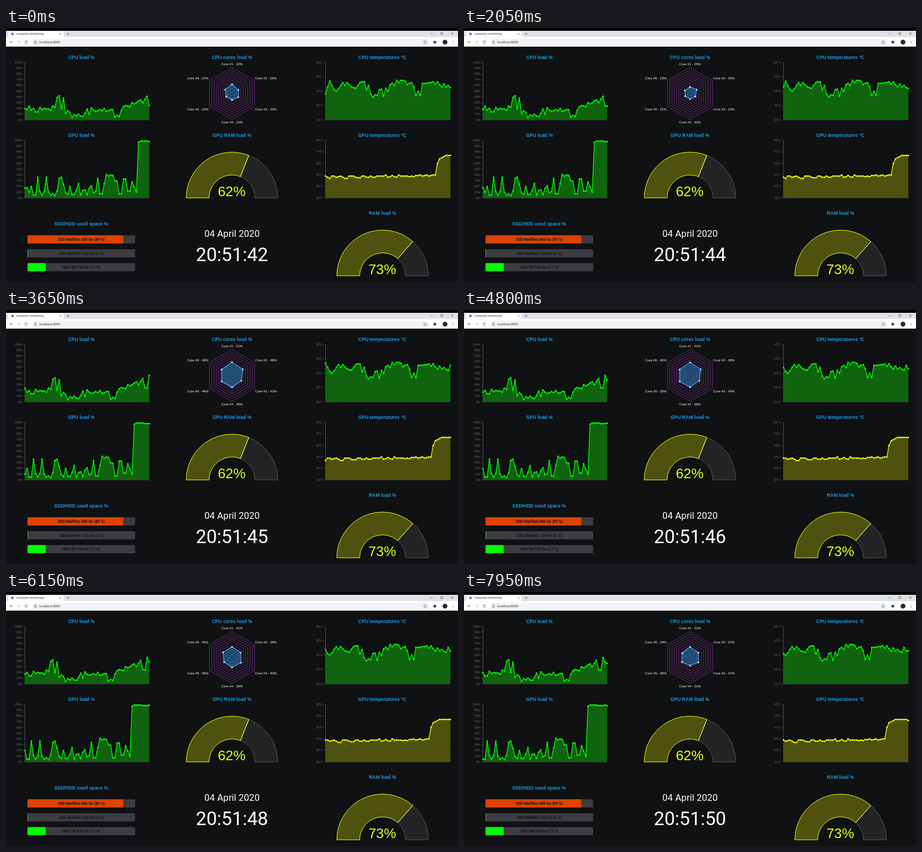
An HTML page for the animation above (8 s loop, 800x450 px).

```html
<!DOCTYPE html>
<html lang="en">
<head>
<meta charset="utf-8">
<title>computer-monitoring</title>
<style>
html, body { margin: 0; width: 100%; height: 100%; overflow: hidden; background: #0f1112; }
svg { display: block; width: 800px; height: 450px; }
text { font-family: "Liberation Sans", Arial, sans-serif; }
.title { font-size: 8.4px; font-weight: bold; fill: #2196dc; text-anchor: middle; }
.tick { font-size: 4.9px; fill: #6b6b6b; text-anchor: end; }
.core { font-size: 5.9px; fill: #fff; }
.roboto { font-family: Roboto, sans-serif; }
.middle { text-anchor: middle; }
</style>
</head>
<body>
<svg id="stage" viewBox="0 0 800 450"></svg>
<script>
const LOOP = 8000;
const POINTS = 59;
const STARTS = [-100, 1390, 2940, 4790, 6490];
const TWEEN = 1000;
const GREEN = '#00ff00', YELLOW = '#eeff10';

const charts = [
  { id: 'cpu', title: 'CPU load %', x: 33.5, y: 61, w: 220, min: 0, max: 100, step: 10, unit: '%', color: GREEN, fill: '#10640f',
    data: [20,18,24,17,20,14,14,22,18,20,19,19,17,24,22,39,42,20,38,11,16,13,4,9,7,10,7,6,11,19,10,21,17,15,16,18,
      16,20,15,16,18,18,5,8,6,17,23,25,24,23,30,28,30,33,35,30,36,41,25,24,46,38,36] },
  { id: 'temp', title: 'CPU temperatures °C', x: 565.5, y: 61, w: 221, min: 20, max: 60, step: 10, unit: '°C', color: GREEN, fill: '#10640f',
    data: [38,43,47,44,41,40,41.5,44,46,44,46,44.5,43,42.5,42,44,46,46.5,46.5,41,44,38,36,37.5,37,41,41.5,36.5,42,40,
      44.5,45.5,44,47.5,46,47.5,47.5,47,44.5,45.5,46,43,37,40,37,45.5,45.5,45.5,46,46,46.5,45,46.5,44.5,43,45,43,44,
      42.5,42,45.5,43,43] },
  { id: 'gpu', title: 'GPU load %', x: 33.5, y: 199.2, w: 220, min: 0, max: 100, step: 10, unit: '%', color: GREEN, fill: '#10640f',
    data: [17,18,10,20,5,5,36,11,5,11,36,10,5,7,4,12,34,36,24,9,6,20,6,6,13,25,5,13,14,6,17,21,9,11,34,7,7,25,41,38,
      40,39,30,29,7,7,33,33,12,12,28,19,10,97,99,99,99,99,98,98,98,99,98] },
  { id: 'gtemp', title: 'GPU temperatures °C', x: 565.5, y: 199.2, w: 221, min: 30, max: 80, step: 10, unit: '°C', color: YELLOW, fill: '#4f520e',
    data: [49,48,47,49,49,48,48.5,49,48,47,47,49,49,49,48,47.5,47.5,49,49,48,48,49,48,48,49,49,49,49,50,48,48.5,49.5,
      48.5,48,50,49,49,49,49,48.5,49,48.5,49.5,49.5,50,49,49.5,50,49,49.5,50,50,60,64,65,66,67,67,67,67,67,67,66] }
];

const coreLoads = [
  [37,31,31,26,28,32], [32,23,23,21,20,27], [25,30,23,22,21,23],
  [51,48,41,45,46,46], [41,38,40,38,35,40], [41,37,37,31,36,34]
];
const RADAR = { x: 400, y: 116, r: 46 };
const PLOT_H = 101.8;

const text = (x, y, str, attrs = '') => `<text x="${x}" y="${y}" ${attrs}>${str}</text>`;
const title = (x, y, str) => text(x, y, str, 'class="title"');
const rect = (x, y, w, h, fill, rx = 0) => `<rect x="${x}" y="${y}" width="${w}" height="${h}" fill="${fill}" rx="${rx}"/>`;
const circle = (x, y, r, fill) => `<circle cx="${x}" cy="${y}" r="${r}" fill="${fill}"/>`;
const path = (d, stroke, width = 0.8, fill = 'none') => `<path d="${d}" stroke="${stroke}" stroke-width="${width}" fill="${fill}"/>`;
const hexagon = radii => radii.map((r, i) => {
  const a = i * Math.PI / 3;
  return `${(RADAR.x + RADAR.r * r * Math.sin(a)).toFixed(2)},${(RADAR.y - RADAR.r * r * Math.cos(a)).toFixed(2)}`;
});

function browser() {
  const ink = '#5f6368';
  return rect(0, 0, 800, 5, '#000') + rect(0, 5, 800, 12, '#dee1e6') + rect(0, 16, 800, 17, '#fff')
    + path('M2 17Q4 17 4 14V8Q4 6 6 6H100Q102 6 102 8V14Q102 17 104 17Z', 'none', 0, '#fff')
    + circle(11.5, 10.5, 2.3, '#2f7fc1')
    + text(18, 12.2, 'computer-monitoring', 'class="roboto" font-size="5.2" fill="#3c4043"')
    + path('M95 9l3 3m0-3l-3 3M107.500 10.500h5m-2.500-2.500v5', ink, 0.7)
    + path('M12 25H7m2.200-2.200L7 25l2.200 2.200', ink, 0.8)
    + path('M20 25h5m-2.200-2.200L25 25l-2.200 2.200', '#b5b8bb', 0.8)
    + path('M37.700 23.700A2.400 2.400 0 1 0 38 26m0-3.400v1.700h-1.700', ink, 0.8)
    + rect(46, 19, 704, 12, '#f1f3f4', 6)
    + path('M50.500 23h3.500v4.500h-3.500zM52.200 24v2', ink, 0.6)
    + text(59, 27, 'localhost:8080', 'class="roboto" font-size="5.6" fill="#35383b"')
    + path('M742 22l.9 2.100 2.300.2-1.700 1.500.5 2.200-2-1.200-2 1.200.5-2.200-1.700-1.500 2.300-.2z', ink, 0.6)
    + circle(759, 25, 2.6, '#35495e') + circle(777, 25, 4.3, '#27292c')
    + [22.8, 25, 27.2].map(y => circle(791.5, y, 0.6, ink)).join('')
    + path('M751.500 10h4M769.500 8h3.500v3.500h-3.500zM788 8l4 4m0-4l-4 4', '#444', 0.6);
}

function chart(c) {
  const bottom = c.y + PLOT_H;
  let ticks = '';
  for (let v = c.min; v <= c.max; v += c.step) {
    const y = bottom - (v - c.min) / (c.max - c.min) * PLOT_H;
    ticks += path(`M${c.x - 4} ${y}h4`, '#555', 0.6) + text(c.x - 5.5, y + 1.7, v + c.unit, 'class="tick"');
  }
  return title(c.x + c.w / 2 - (c.x < 100 ? 10 : 10), c.y - 6.5, c.title) + ticks
    + path(`M${c.x} ${c.y}V${bottom}H${c.x + c.w}`, '#666', 0.7)
    + `<marker id="dot-${c.id}" markerUnits="userSpaceOnUse" markerWidth="4" markerHeight="4" refX="2" refY="2">${circle(2, 2, 1.5, c.color)}</marker>`
    + `<path id="${c.id}-area" fill="${c.fill}"/>`
    + `<polyline id="${c.id}-line" fill="none" stroke="${c.color}" stroke-width="1.3" stroke-linejoin="round"`
    + ['start', 'mid', 'end'].map(m => ` marker-${m}="url(#dot-${c.id})"`).join('') + '/>';
}

function radar() {
  const labels = [[400, 66.200, 'middle'], [441, 90.600, 'start'], [441, 145.600, 'start'],
    [400, 169.200, 'middle'], [358.500, 145.600, 'end'], [358.500, 90.600, 'end']];
  let rings = '';
  for (let i = 1; i <= 10; i++) {
    rings += `<polygon points="${hexagon(Array(6).fill(i / 10)).join(' ')}" fill="none" stroke="#8a35a0" stroke-width=".75"/>`;
  }
  return title(400, 54.5, 'CPU cores load %') + rings
    + '<polygon id="cores" fill="#2196dc" fill-opacity=".42" stroke="#38a8ea" stroke-width="1.3"/>'
    + labels.map((_, i) => `<circle id="core-dot${i}" r="1.5" fill="#d5e8f5"/>`).join('')
    + labels.map(([x, y, anchor], i) => text(x, y, '', `id="core${i}" class="core" text-anchor="${anchor}"`)).join('');
}

function gauge(cx, cy, percent, name) {
  const at = (p, r) => `${cx - r * Math.cos(Math.PI * p / 100)} ${cy - r * Math.sin(Math.PI * p / 100)}`;
  const arc = (a, b) => `M${at(a, 81)}A81 81 0 0 1 ${at(b, 81)}L${at(b, 40.5)}A40.5 40.5 0 0 0 ${at(a, 40.5)}Z`;
  return title(cx, cy - 108, name) + path(arc(percent, 100), '#666', 0.8, '#222425')
    + path(arc(0, percent), YELLOW, 1, '#4f520e')
    + path(`M${at(percent, 40.5)}L${at(percent, 81)}`, '#e6e8c0', 0.9)
    + text(cx - 0.5, cy - 3, percent + '%', `class="middle" font-size="24.5" fill="${YELLOW}"`);
}

function disk(y, name, percent, color) {
  return rect(38, y, 190.5, 14.5, '#3b3d42', 1.5)
    + rect(38, y, Math.max(0.8, 190.5 * percent / 100), 14.5, color, percent ? 1.5 : 0)
    + text(133.3, y + 9.6, `${name} (${percent} %)`, 'class="roboto middle" font-size="6.6" font-weight="bold" fill="#111"');
}

document.getElementById('stage').innerHTML = rect(0, 0, 800, 450, '#0f1112')
  + browser() + charts.map(chart).join('') + radar()
  + gauge(400, 301, 62, 'GPU RAM load %') + gauge(666.5, 439, 73, 'RAM load %')
  + title(133, 350, 'SSD/HDD used space %')
  + disk(367.3, 'SSD Marlfern 480 Go', 89, '#dd4200')
  + disk(391.9, 'SSD Marlfern 120 Go', 0, GREEN)
  + disk(416.5, 'HDD QN 930 Go', 17, GREEN)
  + text(400, 370, '04 April 2020', 'class="roboto middle" font-size="16.6" fill="#fff"')
  + text(400, 413, '', 'id="clock" class="roboto middle" font-size="33.2" fill="#fff"');

const $ = id => document.getElementById(id);
let shownUpdate = -1;

function drawUpdate(n) {
  for (const c of charts) {
    const bottom = c.y + PLOT_H;
    const pts = c.data.slice(n, n + POINTS).map((v, i) =>
      `${(c.x + i * c.w / (POINTS - 1)).toFixed(2)},${(bottom - (v - c.min) / (c.max - c.min) * PLOT_H).toFixed(2)}`);
    $(c.id + '-line').setAttribute('points', pts.join(' '));
    $(c.id + '-area').setAttribute('d', `M${c.x} ${bottom}L${pts.join('L')}V${bottom}Z`);
  }
  coreLoads[n + 1].forEach((v, i) => { $('core' + i).textContent = `Core #${i + 1} - ${v}%`; });
}

function render(t) {
  const n = STARTS.filter(s => s <= t).length - 1;
  if (n !== shownUpdate) drawUpdate(shownUpdate = n);

  const left = (1 - Math.min(1, (t - STARTS[n]) / TWEEN)) ** 4;
  const corners = hexagon(coreLoads[n + 1].map((v, i) => (v + (coreLoads[n][i] - v) * left) / 100));
  $('cores').setAttribute('points', corners.join(' '));
  corners.forEach((p, i) => {
    const [x, y] = p.split(',');
    $('core-dot' + i).setAttribute('cx', x);
    $('core-dot' + i).setAttribute('cy', y);
  });

  // the recorded clock runs slightly fast
  $('clock').textContent = '20:51:' + (42 + Math.floor(t * 1.0064 / 1000));
}

const origin = performance.now();
function frame() {
  render((performance.now() - origin) % LOOP);
  requestAnimationFrame(frame);
}
frame();
</script>
</body>
</html>
```
